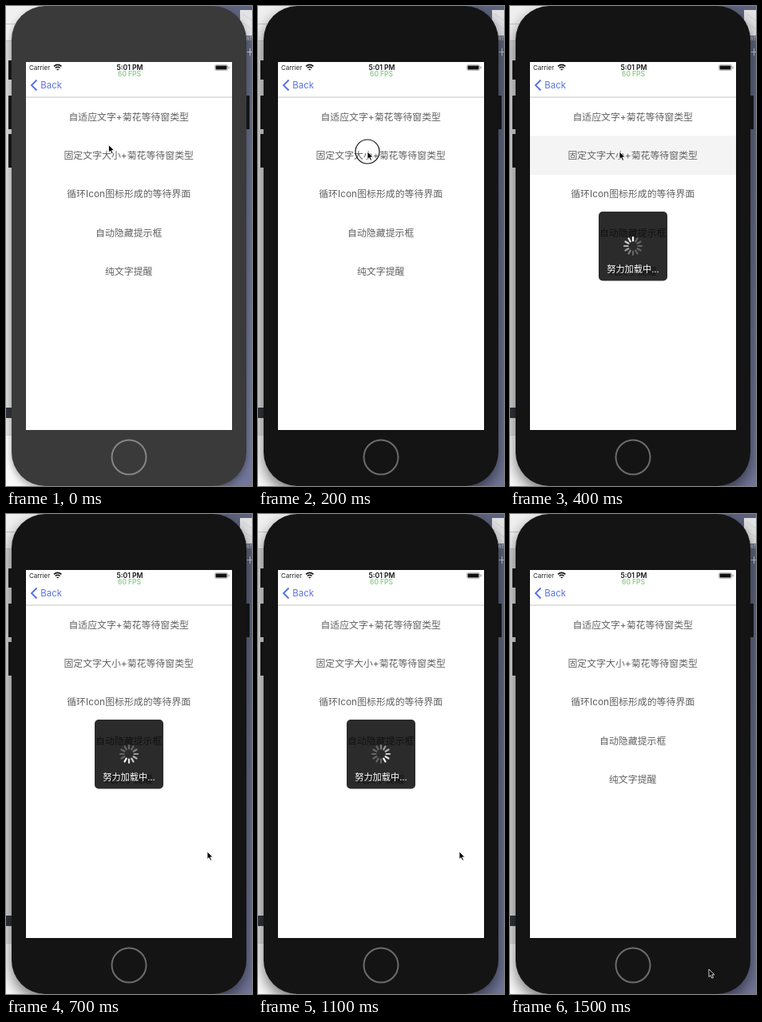
An HTML page that plays this animation: 308 px wide and 600 px high, repeating every 1.6 s.

```html
<!DOCTYPE html>
<html lang="zh-CN">
<head>
<meta charset="utf-8">
<style>
  html, body { margin: 0; width: 100%; height: 100%; overflow: hidden; }
  svg { display: block; font-family: Inter, "Noto Sans CJK SC", "Noto Sans CJK", sans-serif; }
  #body { fill: #3a3a3a; filter: drop-shadow(0 4px 4px #0005); }
  #home { stroke: #858585; }
  .focused #body { fill: #141414; filter: drop-shadow(0 8px 9px #0008); }
  .focused #home { stroke: #6c6c6c; }
</style>
</head>
<body>
<svg id="stage" width="308" height="600" viewBox="0 0 308 600">
  <defs>
    <linearGradient id="slate" x2="0" y2="1">
      <stop offset="0" stop-color="#5d637c"/>
      <stop offset="1" stop-color="#72779a"/>
    </linearGradient>
  </defs>

  <!-- Desktop -->
  <rect width="308" height="600" fill="#d8d8d8"/>
  <rect width="240" height="43" fill="#f0f0f0"/>
  <path d="M0 22.5H20M0 43.5H8" stroke="#c4c4c4"/>
  <rect y="502" width="9" height="13" fill="#30343a"/>
  <rect y="516" width="9" height="20" fill="#e2e2e2"/>
  <rect y="537" width="239" height="63" fill="#fafafa"/>
  <rect x="239" width="69" height="600" fill="url(#slate)"/>
  <rect x="293" y="5" width="15" height="32" fill="#e3e3e6"/>
  <path d="M296 10l12 8M295 20l13 9" stroke="#d0d0d4"/>
  <text x="301" y="43" font-size="6" fill="#ddd">RT</text>
  <text x="301" y="61" font-size="9" fill="#eee">十</text>

  <!-- Phone -->
  <path d="M3 68h6v24H3zM3 112h6v42H3zM3 160h6v42H3zM300 112h5v42h-5z" fill="#17181b"/>
  <rect id="body" x="7" width="294" height="600" rx="42"/>
  <circle id="home" cx="154" cy="564" r="21.5" fill="none" stroke-width="2"/>
  <rect x="25" y="70" width="258" height="460" fill="#fff"/>
  <path d="M25 114H283" stroke="#c4c4c4"/>

  <!-- Status and navigation bars -->
  <text x="29" y="80" font-size="8" fill="#222">Carrier</text>
  <g fill="none" stroke="#111" stroke-width="1.5">
    <path d="M60 75.4q4.7-4 9.4 0M61.8 77.5q2.9-2.4 5.8 0"/>
    <path d="M63.6 79.4h2.2"/>
  </g>
  <text x="155" y="80" font-size="8.6" font-weight="600" text-anchor="middle" fill="#111">5:01 PM</text>
  <text x="154.5" y="88.2" font-size="8.4" font-weight="600" text-anchor="middle" fill="#8ccd8c">60 FPS</text>
  <rect x="261.5" y="73.5" width="16" height="7" rx="1.5" fill="#fff" stroke="#999" stroke-width=".6"/>
  <rect x="262.5" y="74.5" width="14" height="5" rx=".7" fill="#111"/>
  <path d="M279 75.7v2.6" stroke="#777"/>
  <path d="M38.5 92.5L32 99l6.5 6.5" fill="none" stroke="#5872e2" stroke-width="1.9"/>
  <text x="43.3" y="103" font-size="11.4" fill="#5872e2">Back</text>

  <rect id="highlight" x="25" y="162.5" width="258" height="48.5"/>
  <g id="rows" font-size="11.9" text-anchor="middle" fill="#626262"></g>

  <g id="hud">
    <rect x="111" y="257" width="86" height="86.5" rx="5" fill="#000" fill-opacity=".83"/>
    <g id="spinner" transform="translate(154 300)" stroke="#fff" stroke-width="2.2" stroke-linecap="round"></g>
    <text x="154" y="333" font-size="11.2" text-anchor="middle" fill="#fff">努力加载中...</text>
  </g>

  <circle id="ring" cx="137" cy="182" r="15" fill="none" stroke="#111" stroke-width="1.2"/>
  <path id="cursor" d="M0 0V9.6L2.2 7.6L3.8 11.3L5.5 10.5L3.9 6.9H7z" stroke="#fff" stroke-width=".8"/>
</svg>
<script>
  const $ = id => document.getElementById(id);
  const LOOP = 1600, STEP = 100, SPOKES = 12;

  const add = (parent, tag, attrs, text = '') => {
    const el = document.createElementNS('http://www.w3.org/2000/svg', tag);
    for (const key in attrs) el.setAttribute(key, attrs[key]);
    el.textContent = text;
    return parent.appendChild(el);
  };
  const show = (id, opacity) => $(id).setAttribute('opacity', opacity);

  ['自适应文字+菊花等待窗类型', '固定文字大小+菊花等待窗类型', '循环Icon图标形成的等待界面',
   '自动隐藏提示框', '纯文字提醒'].forEach((label, i) =>
    add($('rows'), 'text', { x: 153.7, y: 142.6 + i * 48.3 }, label));

  const spokes = Array.from({ length: SPOKES }, (_, i) =>
    add($('spinner'), 'path', { d: 'M0-6.5V-11', transform: `rotate(${i * 30})` }));

  // Pointer stops: [time, x, y]
  const path = [[0, 128.5, 173.5], [100, 137, 182], [400, 137, 182],
                [700, 252, 422], [1300, 252, 422], [1500, 249, 569], [LOOP, 249, 569]];

  function pointerAt(t) {
    const i = path.findIndex(p => p[0] > t);
    const [t0, x0, y0] = path[i - 1], [t1, x1, y1] = path[i];
    const k = (t - t0) / (t1 - t0), e = k * k * (3 - 2 * k);
    return [x0 + (x1 - x0) * e, y0 + (y1 - y0) * e];
  }

  function draw(t) {
    $('stage').classList.toggle('focused', t >= 200);
    show('ring', t === 200 ? 1 : 0);
    show('highlight', t === 300 || t === 400 ? 1 : 0);
    $('highlight').setAttribute('fill', t === 300 ? '#d9d9d9' : '#f4f4f4');
    show('hud', t < 300 || t > 1300 ? 0 : t === 300 || t === 1300 ? 0.5 : 1);

    const head = Math.round((t - 400) * 0.024 + 2 * SPOKES);
    spokes.forEach((spoke, i) => {
      const age = (head - i + SPOKES) % SPOKES;
      spoke.setAttribute('stroke-opacity', Math.max(0.28, 1 - age * 0.12));
    });
    $('cursor').setAttribute('transform', `translate(${pointerAt(t)})`);
  }

  function tick() {
    draw(Math.floor(performance.now() % LOOP / STEP) * STEP);
    requestAnimationFrame(tick);
  }
  tick();
</script>
</body>
</html>
```
